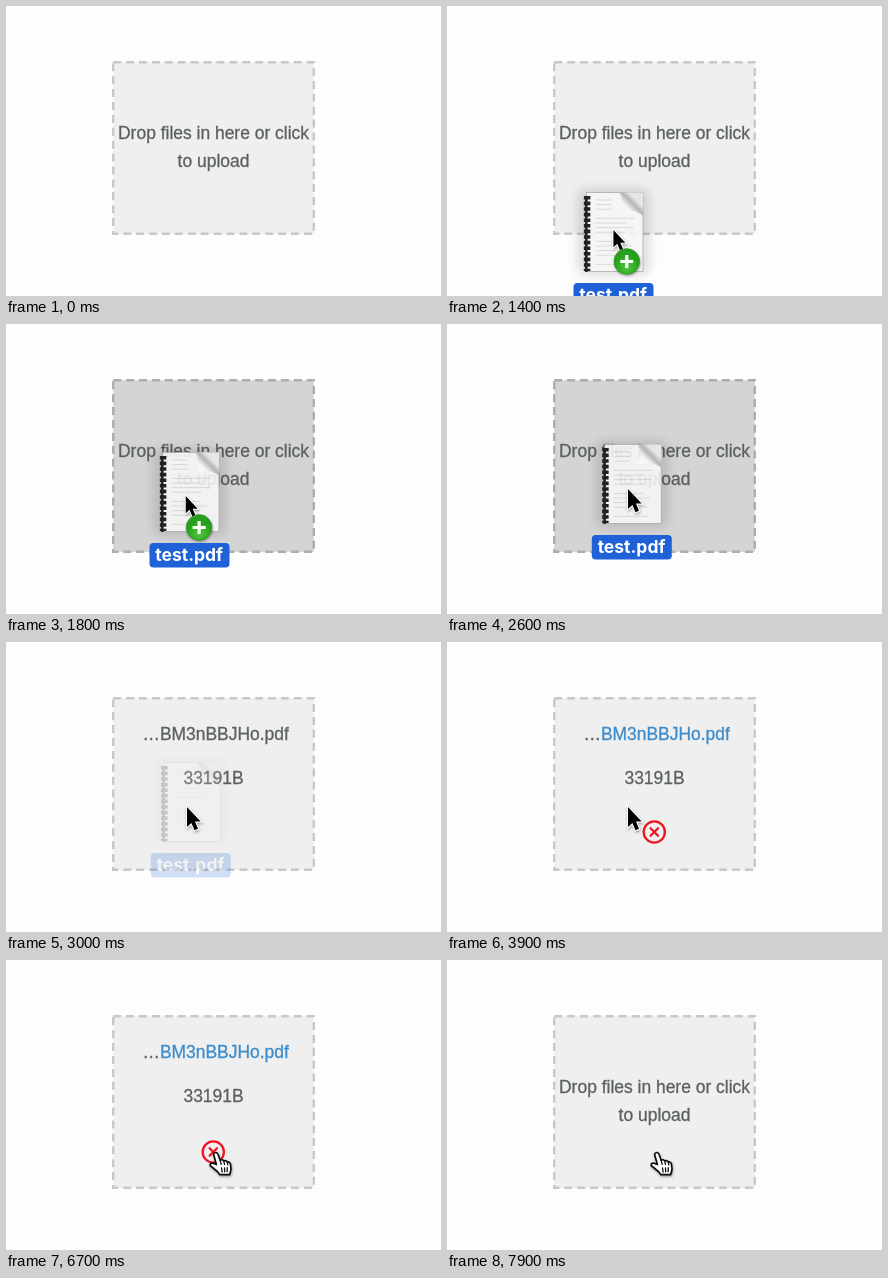
These frames come from a looping animation (435 by 290 pixels, 8000 ms). An HTML page:

```html
<!DOCTYPE html>
<html lang="en">
<head>
<meta charset="utf-8">
<title>File drop zone</title>
<style>
  html, body { margin: 0; width: 100%; height: 100%; overflow: hidden; background: #fdfdfd; }
  svg { display: block; width: 435px; height: 290px; }
  text { font: 17.45px "Liberation Sans", Arial, sans-serif; fill: #5b6062; stroke: #5b6062; stroke-width: .3px; }
  .link { fill: #3a8ccd; stroke: #3a8ccd; }
  .label { font: 700 17.5px Inter, "Liberation Sans", sans-serif; fill: #fff; stroke: none; }
</style>
</head>
<body>
<svg viewBox="0 0 435 290">
  <defs>
    <filter id="blur" x="-40%" y="-40%" width="180%" height="180%"><feGaussianBlur stdDeviation="5"/></filter>
    <filter id="soft" x="-40%" y="-40%" width="180%" height="180%">
      <feDropShadow dx="0.5" dy="1.2" stdDeviation="1" flood-opacity=".4"/>
    </filter>
    <linearGradient id="fold" x1="0" y1="1" x2="1" y2="0">
      <stop offset="0" stop-color="#fff"/>
      <stop offset=".35" stop-color="#f4f4f4"/>
      <stop offset=".55" stop-color="#b4b4b4"/>
      <stop offset=".7" stop-color="#e6e6e6"/>
    </linearGradient>
    <radialGradient id="green" cy=".75">
      <stop offset="0" stop-color="#4cc93a"/>
      <stop offset="1" stop-color="#289f1d"/>
    </radialGradient>
  </defs>

  <rect id="zone" x="107.2" y="56.2" width="200.6" height="171.6" stroke-width="2.4" stroke-dasharray="8 4.9"/>

  <g id="prompt" text-anchor="middle">
    <text x="207.5" y="133">Drop files in here or click</text>
    <text x="207.5" y="160.5">to upload</text>
  </g>

  <g id="info">
    <text x="136.5" y="98">…<tspan id="name">BM3nBBJHo.pdf</tspan></text>
    <text x="207.5" y="141.5" text-anchor="middle">33191B</text>
    <g id="remove" fill="none" stroke="#f0141e" stroke-width="2.3">
      <circle cx="207.3" cy="190" r="10.6"/>
      <path d="M203.6 186.3l7.4 7.4m0-7.4l-7.4 7.4" stroke-linecap="round"/>
    </g>
  </g>

  <g id="file">
    <rect x="-7" y="-4" width="74" height="88" rx="10" opacity=".11" filter="url(#blur)"/>
    <path d="M3 .5H59.5V79.5H3Z" fill="#fafafa" fill-opacity=".88" stroke="#aaa" stroke-width=".8"/>
    <path id="print" fill="none" stroke="#777" stroke-opacity=".22" stroke-width="1"/>
    <path d="M36 .5Q41 10 37 20Q50 16 59.5 24V.5Z" fill="url(#fold)"/>
    <path d="M3.6 4V79" stroke="#222" stroke-width="6.5" stroke-dasharray="3.6 2"/>
    <path d="M2.8 4V80" stroke="#222" stroke-width="2.6"/>
    <rect x="-10" y="91" width="80" height="24.5" rx="4" fill="#1f62d8"/>
    <text class="label" x="29.7" y="109" text-anchor="middle">test.pdf</text>
  </g>

  <g id="arrow" filter="url(#soft)">
    <path id="tip" d="M.5 .5V20.5L4.9 16.4L8 23.8L11.5 22.3L8.5 15.1H14.2Z" stroke="#fff" stroke-width="2" paint-order="stroke"/>
  </g>
  <g id="badge" filter="url(#soft)">
    <circle r="12.8" fill="url(#green)" stroke="#2a8a22" stroke-width=".7"/>
    <path d="M-6.5 0H6.5M0-6.5V6.5" stroke="#fff" stroke-width="3.2"/>
  </g>
  <g id="hand" filter="url(#soft)" stroke="#111" stroke-width="1.7" stroke-linejoin="round" stroke-linecap="round">
    <path fill="#fff" d="M4.6 3Q5 .8 7 1Q8.5 1.2 9.1 3L11.2 8.8Q13.5 7.4 14.7 9.5Q17 8.4 18.2 10.4Q20.7 9.8 21.4 12.4L22 17.5Q21.8 19.5 20.6 23.2H10.8Q9.5 20.5 6 18L1.3 14.2Q.6 11.2 4 11.7L7.4 13Z"/>
    <path fill="none" stroke-width="1.3" d="M11.2 8.8l1 4M14.7 9.5l.8 3.4M18.2 10.4l.6 3M12.5 16.5l.6 4M15.5 16.3l.2 4M18.3 16.2l-.2 4"/>
  </g>
</svg>
<script>
  const LOOP = 8000, STEP = 100;
  const el = id => document.getElementById(id);
  const show = (id, on) => el(id).setAttribute("visibility", on ? "visible" : "hidden");
  const move = (id, x, y) => el(id).setAttribute("transform", `translate(${x} ${y})`);

  // time, page x, page y
  const drag = [
    [1200, 67, 262], [1300, 105, 222], [1400, 136.5, 186], [1500, 146, 162],
    [1600, 150, 146], [1700, 152, 136], [1800, 153.5, 128], [1900, 154, 122], [2000, 154.8, 120]
  ];
  // time, pointer shape, x, y
  const pointer = [
    [0, ""], [1200, "arrow", 103, 289], [1300, "arrow", 138, 253], [1400, "arrow", 166, 223.5],
    [1500, "arrow", 173, 201], [1600, "arrow", 176, 188], [1700, "arrow", 178, 179],
    [1800, "arrow", 179.3, 171.5], [1900, "arrow", 180, 166.5], [2000, "arrow", 180.5, 164.5],
    [4100, "hand", 197, 174], [4200, "hand", 195, 178], [4900, ""],
    [5800, "arrow", 252, 289.3], [5900, "arrow", 237, 262], [6000, "arrow", 222, 232],
    [6100, "arrow", 209, 204], [6200, "arrow", 202, 188], [6400, "hand", 203, 191.5]
  ];
  const at = (table, t) => table.findLast(row => row[0] <= t) || table[0];

  let lines = "";
  for (let i = 0; i < 15; i++) {
    const y = 8 + i * 4.6;
    const end = y < 24 ? 28 : 38 + (i * 7) % 15;
    if (i % 5 !== 3) lines += `M12 ${y}H${end}`;
  }
  el("print").setAttribute("d", lines);

  function draw(t) {
    const over = t >= 1500 && t < 3000;
    el("zone").setAttribute("fill", over ? "#d4d4d4" : "#efefef");
    el("zone").setAttribute("stroke", over ? "#adadad" : "#c8c8c8");

    const loaded = t >= 3000 && t < 7600;
    const done = t >= 3900 && t < 7600;
    show("prompt", !loaded);
    show("info", loaded);
    show("remove", done);
    el("name").setAttribute("class", done ? "link" : "");
    const drop = Math.min(3, Math.max(0, (t - 6600) / STEP));
    move("remove", 0, drop * 2);

    const [, fx, fy] = at(drag, t);
    show("file", t >= 1200 && t < 3100);
    move("file", fx, fy);
    el("file").setAttribute("opacity", t < 2900 ? 1 : t < 3000 ? 0.5 : 0.2);

    const [, shape, x, y] = at(pointer, t);
    for (const id of ["arrow", "hand"]) {
      show(id, shape === id);
      if (shape === id) move(id, x, y);
    }
    const copying = t >= 1300 && t < 2600;
    el("tip").setAttribute("transform", `scale(${copying ? 0.87 : 1})`);
    show("badge", copying);
    if (copying) move("badge", x + 13.8, y + 32);
  }

  const start = performance.now();
  function tick() {
    const t = (performance.now() - start) % LOOP;
    draw(Math.floor(t / STEP) * STEP);
    requestAnimationFrame(tick);
  }
  tick();
</script>
</body>
</html>
```
